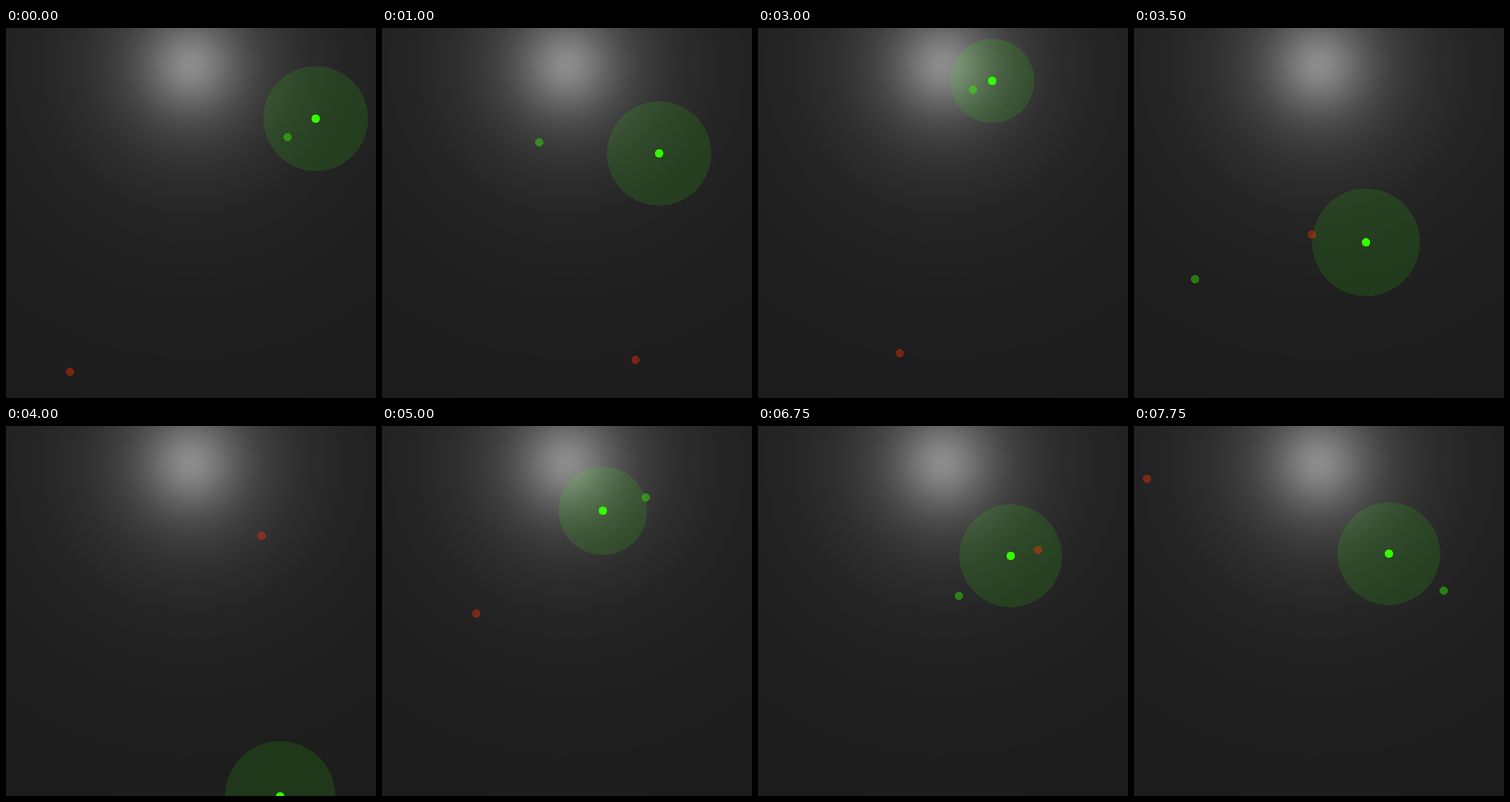
Animation, 500 px wide and 500 px high, one loop 8000 ms. Source, as an HTML page:

```html
<!DOCTYPE html>
<html lang="en">
<head>
<meta charset="utf-8">
<title>Fireflies</title>
<style>
html, body { margin: 0; width: 100%; height: 100%; overflow: hidden; background: #1b1b1b; }
svg { display: block; width: 100vw; height: 100vh; }
circle { shape-rendering: crispEdges; }
</style>
</head>
<body>
<svg viewBox="0 0 500 500">
  <defs>
    <radialGradient id="glow" gradientUnits="userSpaceOnUse" cx="250" cy="50" r="520"></radialGradient>
  </defs>
  <rect width="500" height="500" fill="url(#glow)"/>
  <circle id="range" fill="#3f0" fill-opacity=".12"/>
  <circle id="red" r="5.6" fill="#f30" fill-opacity=".4"/>
  <circle id="dim" r="5.6" fill="#3f0" fill-opacity=".41"/>
  <circle id="lead" r="5.7" fill="#3f0"/>
</svg>
<script>
const STEP = 250, STEPS = 32;
const LAMP = { x: 250, y: 50 };
const get = id => document.getElementById(id);

// Where the fireflies meet; they fly in bowed lines between these
const keys = [
  { step: 0, lead: [418, 122], dim: [380, 147], red: [86, 464] },
  { step: 4, lead: [374, 169], dim: [212, 154], red: [342, 448] },
  { step: 12, lead: [316, 71], dim: [290, 83], red: [191, 439] },
  { step: 16, lead: [370, 500], dim: [370, 500], red: [345, 148] },
  { step: 20, lead: [298, 114], dim: [356, 96], red: [127, 253] },
  { step: 27, lead: [341, 175], dim: [271, 229], red: [378, 167] },
  { step: 31, lead: [344, 172], dim: [418, 222], red: [17, 71] }
];

const light = (d2, spread) => 1 / (1 + d2 / spread);
const clamp = v => Math.min(500, Math.max(0, v));

// Seeded value from -1 to 1
function noise(seed) {
  const v = Math.sin(seed * 12.9898) * 43758.5453;
  return (v - Math.floor(v)) * 2 - 1;
}

function buildGlow() {
  const count = 52;
  for (let i = 0; i <= count; i++) {
    const stop = document.createElementNS("http://www.w3.org/2000/svg", "stop");
    const v = Math.round(26 + 114 * light((520 * i / count) ** 2, 4900));
    stop.setAttribute("offset", i / count);
    stop.setAttribute("stop-color", `rgb(${v},${v},${v})`);
    get("glow").append(stop);
  }
}

function locate(id, step, seed) {
  const i = Math.max(1, keys.findIndex(key => key.step >= step));
  const from = keys[i - 1], to = keys[i];
  const k = (step - from.step) / (to.step - from.step);
  const [x, y] = from[id];
  const dx = to[id][0] - x, dy = to[id][1] - y;
  const bow = 0.6 * noise(seed + i) * Math.sin(Math.PI * k);
  return [clamp(x + dx * k - dy * bow), clamp(y + dy * k + dx * bow)];
}

function place(id, [x, y]) {
  get(id).setAttribute("cx", x + 0.5);
  get(id).setAttribute("cy", y + 0.5);
}

function draw(ms) {
  const step = Math.floor(ms / STEP) % STEPS;
  ["lead", "dim", "red"].forEach((id, n) => place(id, locate(id, step, 10 * n)));
  const [x, y] = locate("lead", step, 0);
  place("range", [x, y]);
  // The brighter the spot, the shorter the range
  const d2 = (x - LAMP.x) ** 2 + (y - LAMP.y) ** 2;
  get("range").setAttribute("r", 75.3 - 38.7 * light(d2, 4337));
}

buildGlow();
const start = performance.now();
function tick() {
  draw(performance.now() - start);
  requestAnimationFrame(tick);
}
tick();
</script>
</body>
</html>
```
